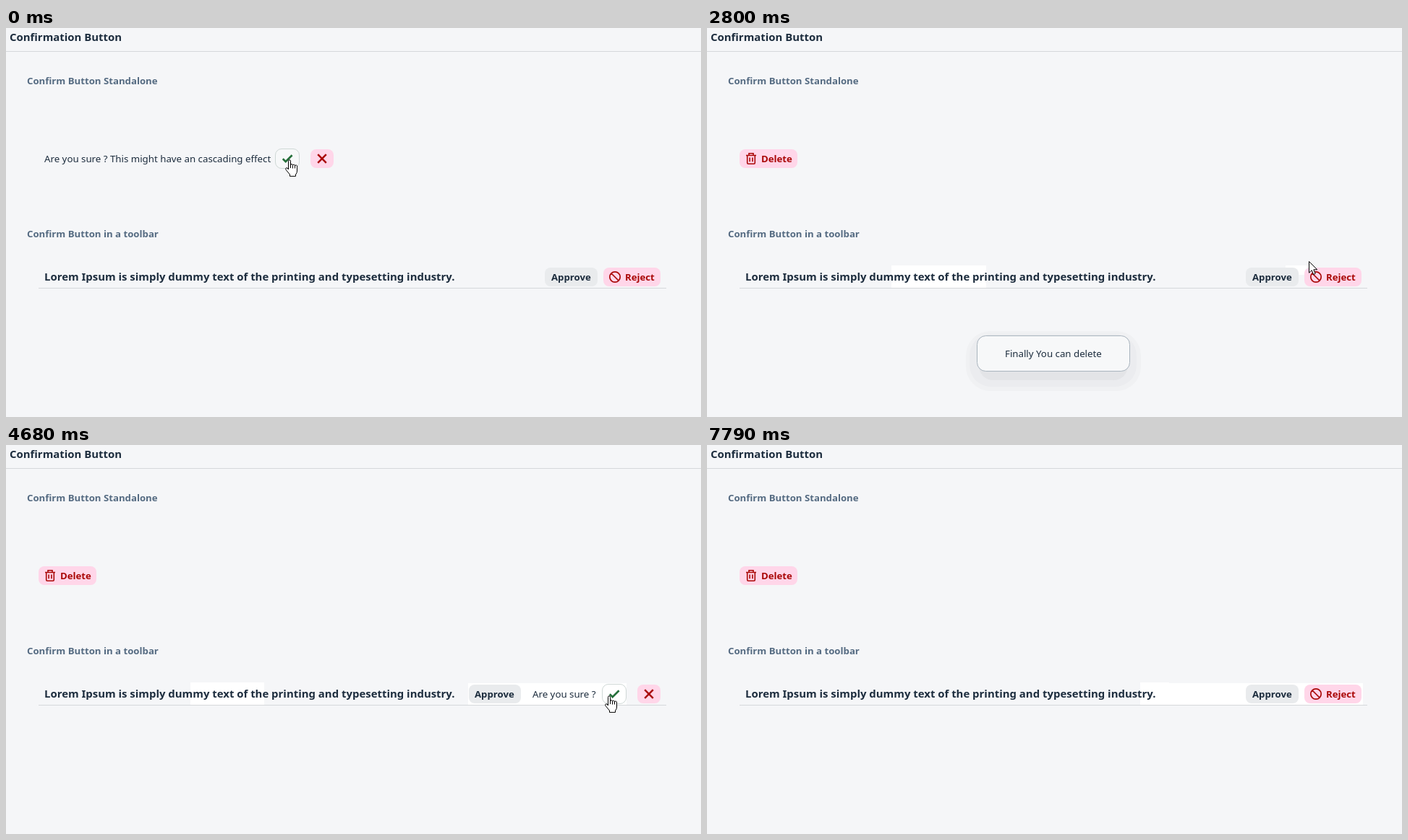
An HTML page with a canvas for the animation above (9.54 s loop, 961 by 539 pixels).

```html
<!DOCTYPE html>
<html lang="en">
<head>
<meta charset="utf-8">
<title>Confirmation Button</title>
<style>
  html, body { margin: 0; width: 100%; height: 100%; overflow: hidden; background: #f5f6f8; }
  canvas { display: block; }
</style>
</head>
<body>
<canvas id="stage" width="961" height="539"></canvas>
<script>
const ctx = document.getElementById('stage').getContext('2d');
const LOOP = 9540;
const FAMILY = '"Noto Sans", "Open Sans", sans-serif';
const BODY = `13.27px ${FAMILY}`, BOLD = `bold 13.2px ${FAMILY}`, TITLE = `bold 14.93px ${FAMILY}`;
const INK = '#1d2d3e', MUTED = '#556b82', LINE = '#d5d8db';

const THEMES = {
  neutral: { fill: '#e9ebed', ink: INK, hover: '#ccd2d8', active: '#4f6275' },
  accept: { fill: '#ebf5cb', ink: '#256f3a', hover: '#cfd8d6', active: '#30914c' },
  reject: { fill: '#ffd6e9', ink: '#aa0808', hover: '#eeb9bf', active: '#e90b0b' }
};

// Pointer stops: start time, left, top, shape
const POINTER = [
  [0, 386, 182, 'hand'], [1100, 390, 184, 'arrow'], [1260, 375, 211, 'arrow'],
  [1420, 352, 361, 'arrow'], [1580, 255, 291, 'arrow'], [1740, 95, 183, 'hand'],
  [1890, 340, 201, 'arrow'], [2000, 400, 200, 'arrow'], [2160, 544, 236, 'arrow'],
  [2310, 712, 269, 'arrow'], [2480, 780, 300, 'arrow'], [2640, 800, 310, 'arrow'],
  [2800, 832, 323, 'arrow'], [2950, 846, 343, 'hand'], [3190, 847, 347, 'hand'],
  [3460, 838, 346, 'hand'], [3620, 801, 337, 'beam'], [3780, 780, 337, 'beam'],
  [3940, 762, 337, 'beam'], [4060, 740, 337, 'beam'], [4220, 718, 344, 'arrow'],
  [4360, 672, 347, 'hand'], [4520, 780, 338, 'beam'], [4680, 828, 347, 'hand'],
  [4840, 836, 348, 'hand'], [5000, 844, 349, 'hand'], [5320, 862, 348, 'arrow'],
  [5480, 876, 347, 'hand'], [6400, 840, 352, 'arrow'], [6540, 660, 312, 'arrow'],
  [6700, 380, 240, 'arrow'], [6860, 183, 185, 'arrow'], [7170, 587, 444, 'arrow'],
  [7340, 773, 537, 'arrow'], [7790, 0, 0, 'none']
];

// White areas of the toolbar: start, end, x, y, width, height
const HIGHLIGHTS = [
  [1420, 1580, 352, 329, 34, 9], [1580, 3190, 255, 329, 131, 31], [3190, 6860, 255, 329, 102, 31],
  [2800, 3190, 800, 329, 32, 13], [4360, LOOP, 639, 330, 219, 30],
  [5480, LOOP, 858, 330, 49, 30], [7170, LOOP, 599, 329, 40, 31]
];

const ARROW = new Path2D('M.5 .5V16.2L4.2 12.7L6.7 18.5L9.2 17.4L6.8 11.8H11.7Z');
const HAND = new Path2D('M4.5 14V2.3a1.5 1.5 0 0 1 3 0V8a1.5 1.5 0 0 1 3 .4a1.5 1.5 0 0 1 3 .7a1.5 1.5 0 0 1 3 1V16Q16.5 19 14.5 21V23.4H6.5V21L1.2 14.6Q0 12.6 1.5 11.8T4.5 14Z');
const HAND_LINES = new Path2D('M7.5 8V12M10.5 8.5V12.5M13.5 9V12.5');
const BEAM = new Path2D('M0 .5H2.5L3.5 1.5L4.5 .5H7M3.5 1V15M0 15.5H2.5L3.5 14.5L4.5 15.5H7');

// Icons are drawn around their own centre
const ICONS = {
  check: { path: new Path2D('M-6.2 .3L-2.3 4.1L6.6 -4.7'), width: 2.7 },
  cross: { path: new Path2D('M-5.8 -5.8L5.8 5.8M5.8 -5.8L-5.8 5.8'), width: 2.5 },
  forbid: { path: new Path2D('M7.2 0A7.2 7.2 0 1 1 -7.2 0A7.2 7.2 0 1 1 7.2 0M-5 -5L5 5'), width: 1.7 },
  trash: { path: new Path2D('M-7 -4.5H7M-3 -4.5V-7.2H3V-4.5M-5.3 -4.5V5.8Q-5.3 7.2 -3.9 7.2H3.9Q5.3 7.2 5.3 5.8V-4.5M-1.9 -1.6V4.2M1.9 -1.6V4.2'), width: 1.6 }
};

function text(string, x, baseline, font = BODY, color = INK) {
  ctx.font = font;
  ctx.fillStyle = color;
  ctx.fillText(string, x, baseline);
}

function box(x, y, w, h, radius, fill, stroke) {
  ctx.beginPath();
  ctx.roundRect(x, y, w, h, radius);
  ctx.fillStyle = fill;
  ctx.fill();
  if (!stroke) return;
  ctx.strokeStyle = stroke;
  ctx.lineWidth = 1;
  ctx.stroke();
}

function icon(name, x, y, color) {
  ctx.save();
  ctx.translate(x, y);
  ctx.strokeStyle = color;
  ctx.lineWidth = ICONS[name].width;
  ctx.stroke(ICONS[name].path);
  ctx.restore();
}

function button(x, y, w, themeName, state, { label, labelX, iconName, iconX = x + w / 2 }, hoverFill = '#fff') {
  const theme = THEMES[themeName];
  if (state) box(x - .5, y - .5, w + 1, 27, 8.5, hoverFill, theme[state]);
  else box(x, y, w, 26, 8, theme.fill);
  if (iconName) icon(iconName, iconX, y + 13, theme.ink);
  if (label) text(label, labelX, y + 18, BOLD, theme.ink);
}

function standalone(t) {
  if (t >= 630) {
    const state = t >= 1740 && t < 1890 && 'hover';
    button(45, 168, 80, 'reject', state, { label: 'Delete', labelX: 75, iconName: 'trash', iconX: 61 });
    return;
  }
  text('Are you sure ? This might have an cascading effect', 53, 186);
  button(373, 168, 32, 'accept', t < 150 ? 'hover' : 'active', { iconName: 'check' }, '#f7f8f9');
  button(421, 168, 32, 'reject', null, { iconName: 'cross' });
}

function toolbar(t) {
  const during = (from, to) => t >= from && t < to;
  ctx.fillStyle = '#fff';
  for (const [from, to, ...area] of HIGHLIGHTS) {
    if (during(from, to)) ctx.fillRect(...area);
  }
  text('Lorem Ipsum is simply dummy text of the printing and typesetting industry.', 53, 350, TITLE);

  if (during(3190, 5930)) {
    const accept = during(4840, 5000) ? 'active' : (during(3190, 3620) || during(4680, 5320)) && 'hover';
    const cancel = during(5760, 5930) ? 'active' : during(5480, 5760) && 'hover';
    button(640, 332, 72, 'neutral', during(4360, 4520) && 'hover', { label: 'Approve', labelX: 648 });
    text('Are you sure ?', 728, 350);
    button(825, 332, 32, 'accept', accept, { iconName: 'check' });
    button(873, 332, 32, 'reject', cancel, { iconName: 'cross' });
  } else {
    const reject = during(3090, 3190) ? 'active' : (during(2950, 3090) || during(5930, 6400)) && 'hover';
    button(745, 332, 73, 'neutral', null, { label: 'Approve', labelX: 754 });
    button(826, 332, 79, 'reject', reject, { label: 'Reject', labelX: 856, iconName: 'forbid', iconX: 842 });
  }
  ctx.fillStyle = LINE;
  ctx.fillRect(45, 360, 868, 1);
}

function toast(t) {
  if (t < 630 || t >= 3700) return;
  ctx.globalAlpha = Math.min(1, 1 - (t - 3090) / 610);
  box(358, 420, 242, 83, 34, '#f0f1f3');
  box(363, 424, 231, 73, 30, '#ebecef');
  box(376, 440, 206, 48, 20, '#e3e4e7');
  box(373.5, 426.5, 211, 49, 12, '#f7f8f9', '#a9b4be');
  text('Finally You can delete', 412, 456);
  ctx.globalAlpha = 1;
}

function pointer(t) {
  const [, x, y, shape] = POINTER.findLast(stop => stop[0] <= t);
  ctx.save();
  ctx.translate(x, y);
  ctx.strokeStyle = '#000';
  ctx.fillStyle = '#fff';
  ctx.lineWidth = 1;
  if (shape === 'arrow') { ctx.fill(ARROW); ctx.stroke(ARROW); }
  if (shape === 'hand') { ctx.fill(HAND); ctx.stroke(HAND); ctx.stroke(HAND_LINES); }
  if (shape === 'beam') ctx.stroke(BEAM);
  ctx.restore();
}

function draw(now) {
  const t = now % LOOP;
  ctx.fillStyle = '#f5f6f8';
  ctx.fillRect(0, 0, 961, 539);
  ctx.fillStyle = LINE;
  ctx.fillRect(0, 32, 961, 1);
  text('Confirmation Button', 5, 18, TITLE);
  text('Confirm Button Standalone', 29, 78, BOLD, MUTED);
  text('Confirm Button in a toolbar', 29, 290, BOLD, MUTED);
  standalone(t);
  toolbar(t);
  toast(t);
  pointer(t);
}

let start;
function tick(now) {
  start ??= now;
  draw(Math.max(0, now - start));
  requestAnimationFrame(tick);
}
requestAnimationFrame(tick);
</script>
</body>
</html>
```
